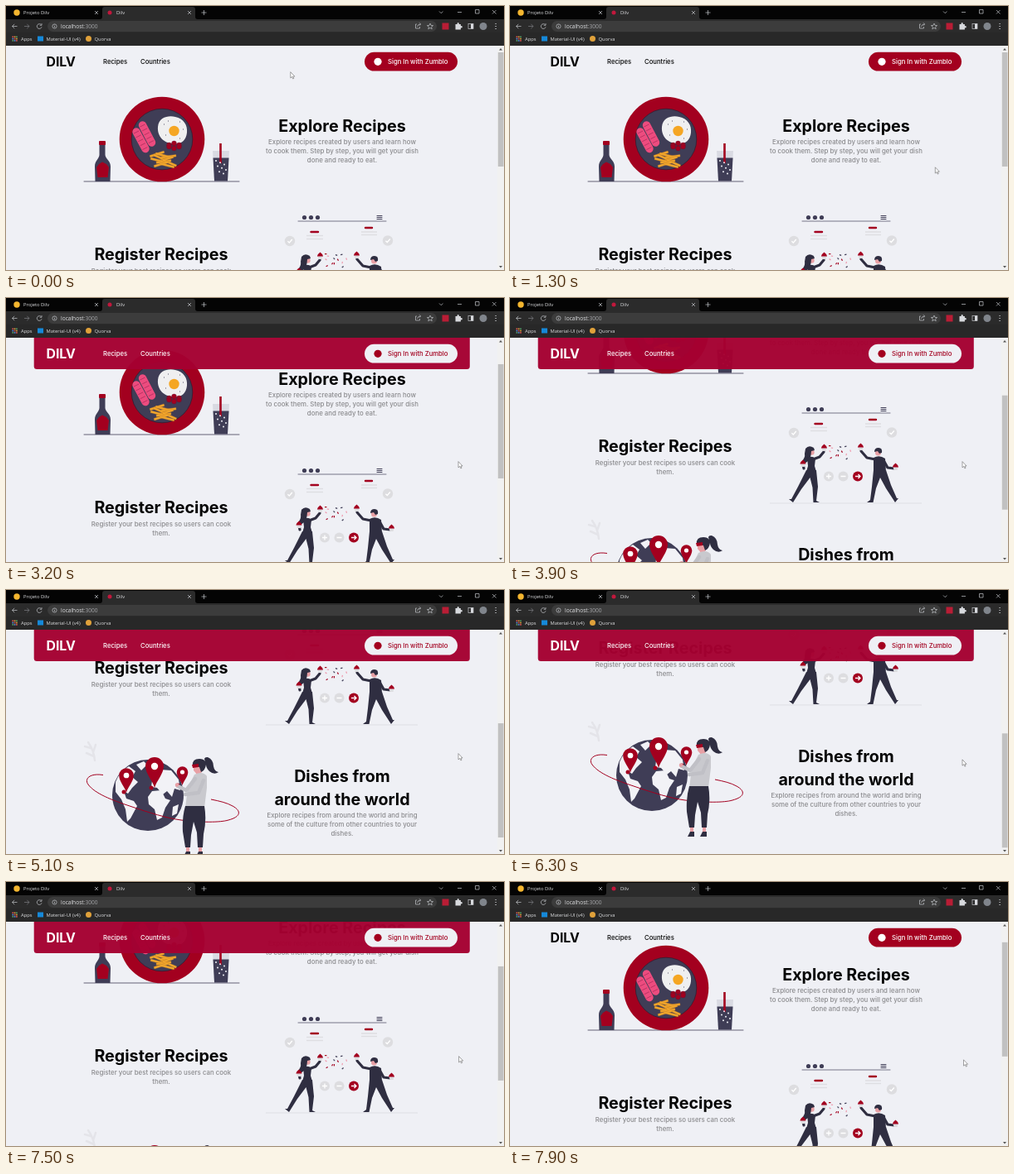
Animation of 600 by 319 pixels, one loop 8 s. Source, as an HTML page:

```html
<!DOCTYPE html>
<html lang="en">
<head>
<meta charset="utf-8">
<title>Dilv</title>
<style>
html, body { margin: 0; width: 100%; height: 100%; overflow: hidden; background: #eff0f5 }
svg { display: block; width: 600px; height: 319px }
text { font-family: Inter, "Open Sans", sans-serif }
.ui text { font: 5.8px "Open Sans", sans-serif; fill: #dedfe1 }
.ui .line { fill: none; stroke: #b9bbbf; stroke-width: .75 }
.h { font-size: 19.7px; font-weight: 700; text-anchor: middle; fill: #050505 }
.p { font-size: 7.85px; font-weight: 500; text-anchor: middle; fill: #8a8a8d }
.link { font-size: 7.7px; font-weight: 500 }
.logo { font-size: 15.8px; font-weight: 700 }
.red { fill: #a3001f } .dark { fill: #3f3d56 } .ink2 { fill: #2f2e41 } .pale { fill: #dddde0 } .skin { fill: #e8a0a5 }
.limb { fill: none; stroke: #3f3d56; stroke-linecap: round; stroke-linejoin: round }
.arm { fill: none; stroke: #2f2e41; stroke-linecap: round; stroke-linejoin: round; stroke-width: 3.2 }
.white { fill: none; stroke: #fff; stroke-width: 1.3 }
#nav { --ink: #050505; --pill: #a3001f; --label: #fff }
#nav.on { --ink: #fff; --pill: #eff0f5; --label: #a3001f }
#nav .ink { fill: var(--ink) } #nav .pill { fill: var(--pill) } #nav .label { fill: var(--label) }
</style>
</head>
<body>
<svg viewBox="0 0 600 319">
<defs>
  <g id="cake">
    <path class="pale" d="M-3 0H3L2 4H-2Z"/>
    <path class="red" d="M-3.6 .5Q-3.5-2 0-4.5Q3.5-2 3.6 .5Z"/>
  </g>
  <g id="check">
    <circle class="pale" r="6.2"/><path class="white" d="M-2.6 .2L-.7 2L2.8-2"/>
  </g>
  <g id="pin">
    <path class="red" d="M0 26C-2 18-11 9-11 0A11 11 0 0 1 11 0C11 9 2 18 0 26Z"/>
    <circle r="4.2" fill="#fff"/>
  </g>
</defs>

<rect width="600" height="319" fill="#eff0f5"/>
<g id="page">
  <!-- breakfast -->
  <path class="limb" stroke-width=".8" d="M94 212H281"/>
  <circle class="red" cx="188" cy="161" r="51.3"/>
  <circle class="dark" cx="188" cy="161" r="36.8" stroke="#302034" stroke-width=".8"/>
  <path d="M164.500 144L175.500 165M157 152L168 172.500" stroke="#ed4c7f" stroke-width="9.4" stroke-linecap="round"/>
  <path id="stripes" stroke="#a62858" stroke-width=".7"/>
  <path d="M183 146C184 134 196 132 204 134C214 136 219 144 218 153C217 163 210 168 201 166C190 166 182 157 183 146Z" fill="#efeff0"/>
  <circle cx="202.500" cy="151" r="6.200" fill="#f5a623"/>
  <path d="M190 143h1M195 139h1M209 140h1M213 149h1M192 156h1M209 160h1" stroke="#55536a"/>
  <g class="red" id="berries" stroke="#6d1031" stroke-width=".5"></g>
  <g id="fries" fill="#f2a72c" stroke="#c47d27" stroke-width=".3"></g>
  <path class="dark" d="M112.500 167H119.500V180C120 185 126 187 126 194L125.500 212H107.500L107 194C107 187 112 185 112.500 180Z"/>
  <rect class="red" x="112" y="163" width="8" height="5" rx="1"/>
  <path class="red" d="M112 191L116 188.500L121 191L124 195L122.500 207H110.500L109 195Z"/>
  <path d="M249 175H269L267 211H251Z" fill="#d9dae2"/>
  <path class="dark" d="M249.500 183.500H268.500L267 211.500H251Z"/>
  <path d="M258.500 166V190" stroke="#a3001f" stroke-width="2.6"/>
  <g id="bubbles" fill="#eff0f5"></g>
  <text class="h" x="405" y="151.500">Explore Recipes</text>
  <text class="p" x="405" y="167">Explore recipes created by users and learn how</text>
  <text class="p" x="405" y="178">to cook them. Step by step, you will get your dish</text>
  <text class="p" x="405" y="189">done and ready to eat.</text>

  <!-- party -->
  <text class="h" x="187" y="306.500">Register Recipes</text>
  <text class="p" x="187" y="322.500">Register your best recipes so users can cook</text>
  <text class="p" x="187" y="333.500">them.</text>
  <g transform="translate(0 121)">
    <path class="limb" stroke-width=".7" d="M352 139H458"/>
    <path d="M313 248H496" stroke="#d6d6dc" stroke-width=".7"/>
    <g class="dark"><circle cx="359.500" cy="134.500" r="2.600"/><circle cx="367.500" cy="134.500" r="2.600"/><circle cx="375.500" cy="134.500" r="2.600"/></g>
    <path class="limb" stroke-width="1" d="M447 132.500H453M447 134.500H453M447 136.500H453"/>
    <path d="M367.500 152H376M433 147H441" stroke="#a3001f" stroke-width="2.400" stroke-linecap="round"/>
    <path d="M362 156.500H382M362 160.500H382M428 152H447M428 155.500H447" stroke="#dedee2" stroke-width="1.300"/>
    <use href="#check" x="342" y="163"/><use href="#check" x="460" y="162.500"/>
    <circle class="pale" cx="384" cy="215.500" r="6"/><circle class="pale" cx="401.500" cy="215.500" r="6"/><circle class="red" cx="419" cy="215.500" r="6"/>
    <path class="white" d="M381 215.500h6M384 212.500v6M398.500 215.500h6M416 215.500h6M419.500 213l2.500 2.500l-2.500 2.500"/>
    <g id="confetti"></g>
    <!-- woman -->
    <circle class="skin" cx="363.500" cy="186.500" r="3.200"/>
    <path class="ink2" d="M356 182Q360 177 366 181L367 184L363 185Q363 190 361 195Q356 201 351 198Q356 193 355 188Z"/>
    <path class="arm" d="M365 195L373 192L378 186M359 194L353 200L354 206"/>
    <path class="ink2" d="M358 193Q364 190 368 194L367 203L369 210H357L359 203Z"/>
    <path class="ink2" d="M357 208H369L371 228L369 245L373 247H365.500L364.500 229L361.500 217L351 231L341 247L336 243L339 243L347 228Z"/>
    <use href="#cake" x="378.500" y="181"/><use href="#cake" x="353" y="200"/>
    <!-- man -->
    <circle class="skin" cx="443.500" cy="187" r="3.500"/>
    <path class="ink2" d="M439 186Q439 181 444 181Q449 181 448 187L445 188L443 185Z"/>
    <path class="arm" d="M440 195L430 193L423 185M450 196L455 205L463 206"/>
    <path class="ink2" d="M438 193Q445 189 452 194L453 210H438Z"/>
    <path class="ink2" d="M438 208H453L459 226L466 242L468 242L464 247L453 230L446 217L441 230L437.500 247H430L434 244L436 228Z"/>
    <use href="#cake" x="422.500" y="180"/><use href="#cake" x="464.500" y="204"/>
  </g>

  <!-- world -->
  <g transform="translate(0 206)">
    <path d="M107 206Q106 194 99 184M106 201L97 197M105 196L108 187M102 191L95 189" fill="none" stroke="#e4e4e9" stroke-width="2.500" stroke-linecap="round"/>
    <circle class="dark" cx="171" cy="248" r="43"/>
    <g fill="#f2f2f6">
      <path d="M132 232Q137 219 148 213L156 219L152 226L159 232L152 239L147 246L142 243L145 252L154 255L158 261L150 276L146 280L144 265L139 253L132 244Z"/>
      <path d="M157 211L166 207L170 211L163 218Z"/>
      <path d="M177 223L186 217L199 218L208 229L210 242L203 240L200 250L194 243L189 247L182 239L175 238Z"/>
      <path d="M176 243L187 242L192 252L198 254L192 263L188 275L182 278L179 265L172 259L171 250Z"/>
      <path d="M201 262L208 259L206 270L200 273Z"/>
    </g>
    <path d="M117 223.500C101 221 94 228 99 235C107 246 128 254 149 261C172 269 195 276 211 278C235 281 258 281 268 278C283 274 284 267 273 261C266 257 257 255 247 253" fill="none" stroke="#a3001f"/>
    <use href="#pin" transform="translate(145 224) scale(.8)"/>
    <use href="#pin" transform="translate(179 213)"/>
    <use href="#pin" transform="translate(212.500 220) scale(.62)"/>
    <g class="red"><circle cx="142" cy="244" r="2.500"/><circle cx="175" cy="239" r="2.500"/><circle cx="207" cy="236" r="2.500"/></g>
    <!-- traveller -->
    <path class="skin" d="M226 211L234 210L236 220L231 224L226 218Z"/>
    <path class="ink2" d="M225 212Q224 204 233 204Q238 204 240 207Q237 202 243 202Q250 205 250 213Q251 219 256 220Q251 224 245 219Q241 215 241 211Q240 218 235 220L233 214Z"/>
    <path class="red" d="M224 211L232 210V214L225 215Z"/>
    <path d="M227 223Q237 218 242 225L242 239L239 263H216L219 239Z" fill="#c9c9ce"/>
    <path d="M228 228L217 242L207 237M238 230L232 245L216 247" fill="none" stroke="#c0c0c6" stroke-width="4.500" stroke-linecap="round" stroke-linejoin="round"/>
    <circle class="skin" cx="206" cy="235.500" r="2.200"/>
    <path class="skin" d="M217 309H221V318H217ZM232 309H236V318H232Z"/>
    <path class="ink2" d="M216 261H239Q242 278 238 295L237 311H231L230 293L226 280L223 296L222 311H216L213 292Q212 275 216 261ZM214 322L217 316H222V322ZM229 322L232 316H237V322Z"/>
  </g>
  <text class="h" x="405" y="437.500">Dishes from</text>
  <text class="h" x="405" y="466">around the world</text>
  <text class="p" x="405" y="481">Explore recipes from around the world and bring</text>
  <text class="p" x="405" y="492">some of the culture from other countries to your</text>
  <text class="p" x="405" y="503">dishes.</text>
</g>

<g id="nav">
  <path id="bar" d="M33.700 48H558.800V82.500Q558.800 86 555.300 86H37.200Q33.700 86 33.700 82.500Z" fill="#a60031"/>
  <text class="logo ink" x="48.500" y="73">DILV</text>
  <text class="link ink" x="117" y="70.300">Recipes</text>
  <text class="link ink" x="162" y="70.300">Countries</text>
  <rect class="pill" x="432" y="55.800" width="112" height="22.800" rx="11.400"/>
  <circle class="label" cx="448" cy="67.300" r="4.600"/>
  <text class="link label" x="460" y="70.300">Sign In with Zumblo</text>
</g>

<rect x="592" y="48" width="8" height="271" fill="#f1f1f1"/>
<rect id="thumb" x="592.800" y="56" width="6.700" height="138" fill="#c1c1c1"/>
<path d="M594 53.500L596 51L598 53.500ZM594 314L596 316.500L598 314Z" fill="#555"/>

<!-- browser -->
<g class="ui">
  <rect width="600" height="48" fill="#282828"/>
  <rect width="600" height="17" fill="#040404"/>
  <path d="M113 16Q116 16 116 13V4Q116 1 119 1H225Q228 1 228 4V13Q228 16 231 16H600V32H0V16Z" fill="#2b2b2b"/>
  <circle cx="13" cy="8" r="3.700" fill="#f4b62f"/><text x="21" y="10">Projeto Dilv</text>
  <circle cx="125" cy="8" r="2.500" fill="#c2183c"/><text x="133" y="10">Dilv</text>
  <path class="line" d="M107 6l4 4m0-4l-4 4M219 6l4 4m0-4l-4 4M235.500 8h6m-3-3v6M522 6.500l2.200 2.200l2.200-2.200M544 7.500h5M565.500 4.500h4.500v4.500h-4.500ZM586 5l4.500 4.500m0-4.500l-4.500 4.500"/>
  <path class="line" d="M13.500 24.500H7.500m2.700-2.700l-2.700 2.700l2.700 2.700"/>
  <path class="line" style="stroke:#77797d" d="M22 24.500h6m-2.700-2.700l2.700 2.700l-2.700 2.700"/>
  <path class="line" d="M42.500 22.800A2.900 2.900 0 1 0 43 25.300M43 21v2.300h-2.300"/>
  <rect x="50" y="18" width="469" height="13" rx="6.500" fill="#3c3c3c"/>
  <circle class="line" cx="58.500" cy="24.500" r="2.600"/><path class="line" d="M58.500 24v2M58.500 22.600v.7"/>
  <text x="66" y="26.700" style="font-size:6.600px">localhost<tspan fill="#a5a6a9">:3000</tspan></text>
  <path class="line" d="M495 22h-1.500v5h5v-2M495.500 25q.5-3 4-3m-1.500-1.700l1.700 1.700l-1.700 1.700"/>
  <path class="line" d="M511 21l1 2.400l2.600.2l-2 1.700l.6 2.500l-2.200-1.400l-2.200 1.400l.6-2.500l-2-1.700l2.600-.2Z"/>
  <rect x="525.500" y="20.500" width="8" height="8" fill="#b91d35"/>
  <path d="M541.500 22h2q0-2 1.200-2t1.200 2h2v2q2 0 2 1.200t-2 1.200v2h-6.400Z" fill="#d7d9dd"/>
  <rect class="line" x="557" y="21.500" width="6" height="6"/><rect x="560" y="21.500" width="3" height="6" fill="#d7d9dd"/>
  <circle cx="575" cy="24.500" r="4.500" fill="#80858c"/>
  <path d="M589.500 21.500h1.200M589.500 24.500h1.200M589.500 27.500h1.200" stroke="#d7d9dd" stroke-width="1.200"/>
  <g id="apps"></g><text x="18" y="41.500">Apps</text>
  <rect x="38" y="36.500" width="7" height="6" fill="#1688d8"/><text x="48.500" y="41.500">Material-UI (v4)</text>
  <circle cx="99.500" cy="39.500" r="3.500" fill="#e0a13a"/><text x="106.500" y="41.500">Quorva</text>
</g>
<path id="cursor" d="M0 0V7.300L1.700 5.800L2.900 8.300L4 7.800L2.900 5.400H5.100Z" fill="#fff" stroke="#666" stroke-width=".6"/>
</svg>

<script>
const $ = id => document.getElementById(id);
const fill = (id, n, part) => $(id).innerHTML = Array.from({ length: n }, (_, i) => part(i)).join('');
const dot = (x, y, r) => `<circle cx="${x}" cy="${y}" r="${r}"/>`;

// small repeated parts
const hues = ['#e35656', '#e7a93d', '#54a66a', '#5b91e4'];
fill('apps', 9, i => `<rect x="${7.5 + i % 3 * 2.3}" y="${36.5 + (i / 3 | 0) * 2.3}" width="1.6" height="1.6" fill="${hues[i % 4]}"/>`);
fill('berries', 6, i => dot(196.5 + i % 3 * 6, 168 + (i > 2 ? 4 : 0) - i % 2 * 2, 2.9));
fill('fries', 10, i => `<rect x="-9" y="-1.3" width="18" height="2.6" transform="translate(${182 + i * 7 % 17} ${179 + i * 1.5}) rotate(${[-18, 14, -8, 24][i % 4]})"/>`);
fill('bubbles', 8, i => dot(253 + i * 5 % 13, 187 + i * 2.2, 1));
fill('confetti', 13, i => `<rect width="2.4" height="1.2" transform="translate(${384 + i * 11 % 29} ${178 + i * 5 % 17}) rotate(${i * 50})" fill="${['#a3001f', '#3f3d56', '#ef9aae'][i % 3]}"/>`);
let marks = '';
for (const [x, y] of [[164.5, 144], [157, 152]])
  for (let k = 0; k < 5; k++) marks += `M${x - 3 + k * 2.6} ${y + 2 + k * 4.9}l6-3`;
$('stripes').setAttribute('d', marks);

// keys: [time, value]
const scroll = [[2000, 0], [2100, 16], [2200, 40], [2300, 47], [3600, 47], [3700, 60], [3800, 94], [3900, 121],
  [4000, 137], [4100, 141], [4600, 141], [4700, 158], [4800, 182], [4900, 188], [5000, 190], [5100, 206], [5200, 225], [5300, 230],
  [6700, 230], [6800, 214], [6900, 191], [7000, 184], [7100, 183], [7300, 137], [7500, 90], [7700, 43], [7800, 42], [7900, 33]];
const fade = [[2200, 0], [2300, .12], [2600, .97], [7600, .97], [7800, 0]];
const curX = [[300, 342.8], [400, 490.5], [600, 490.5], [1300, 512.3], [1500, 512.3], [2000, 545], [7300, 545], [7800, 546.5]];
const curY = [[300, 79.7], [400, 191.5], [600, 191.5], [1300, 194.8], [1500, 194.8], [2000, 197.6], [5800, 197.6], [6500, 207.8], [7300, 207.8], [7800, 214.8]];

function at(keys, t) {
  const i = keys.findIndex(k => k[0] > t);
  if (i < 0) return keys[keys.length - 1][1];
  if (!i) return keys[0][1];
  const [t0, a] = keys[i - 1], [t1, b] = keys[i];
  return a + (b - a) * (t - t0) / (t1 - t0);
}

function draw(now) {
  const t = Math.floor(now % 8000 / 100) * 100;  // ten pictures a second
  const s = at(scroll, t);
  $('page').setAttribute('transform', `translate(0 ${-s})`);
  $('thumb').setAttribute('y', 56 + s * .51);
  $('bar').setAttribute('opacity', at(fade, t));
  $('nav').setAttribute('class', s > 45 ? 'on' : '');
  $('cursor').setAttribute('transform', `translate(${at(curX, t)} ${at(curY, t)})`);
  requestAnimationFrame(draw);
}
draw(0);
</script>
</body>
</html>
```
